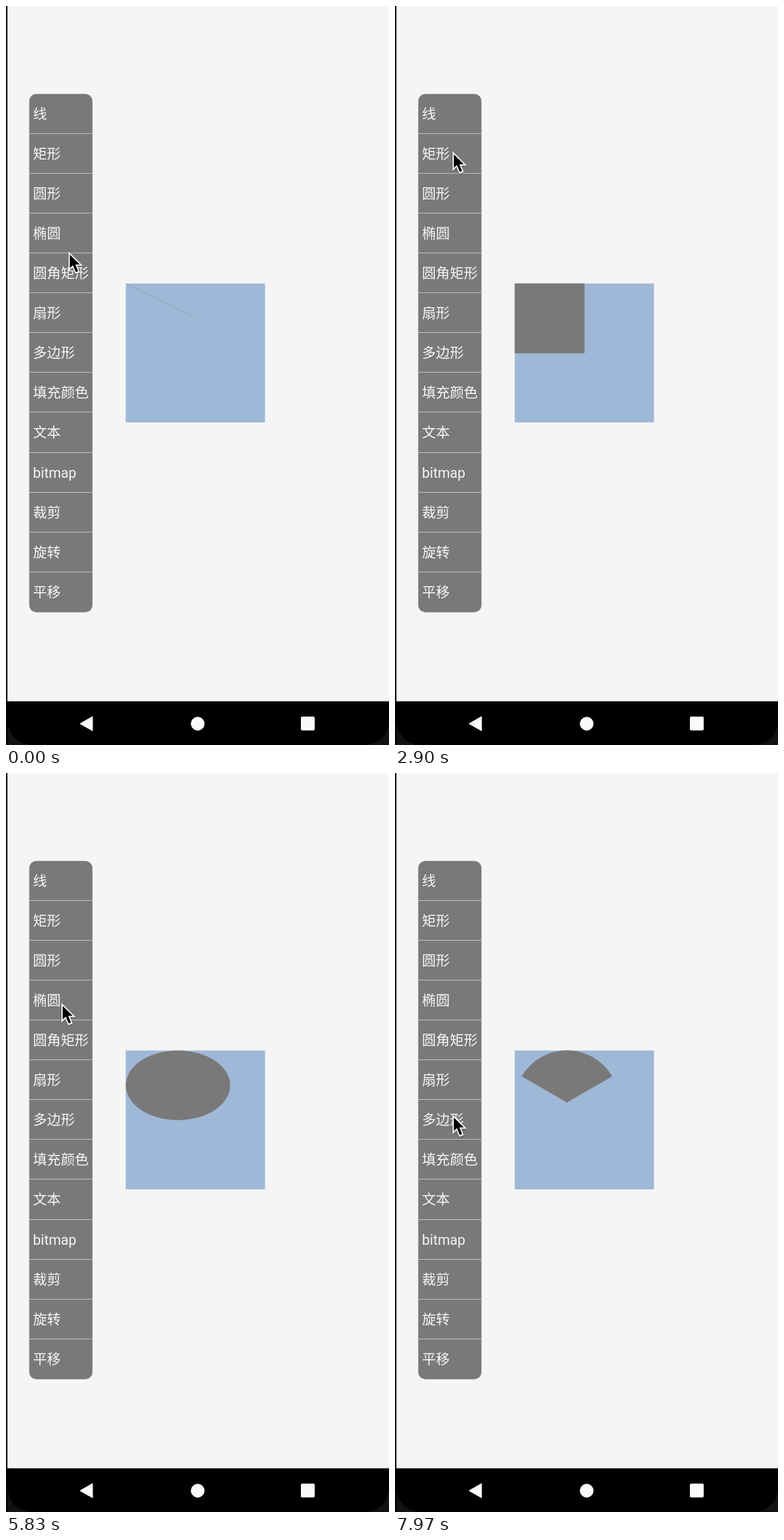
Animation of 539 by 1040 pixels, one loop 8000 ms. Source, as an HTML page:

```html
<!DOCTYPE html>
<html lang="zh-CN">
<head>
<meta charset="utf-8">
<title>Canvas shapes</title>
<style>
  html, body { margin: 0; width: 100%; height: 100%; overflow: hidden; background: #f5f5f5; }
  svg { display: block; }
  text { font: 19.6px Roboto, "Noto Sans CJK SC", "Noto Sans CJK", sans-serif; fill: #f7f7f7; }
  .fill { fill: #797979; }
  .hair { fill: none; stroke: #797979; stroke-opacity: .35; }
  #cursor { filter: drop-shadow(0 1px 1px rgba(0, 0, 0, .35)); }
</style>
</head>
<body>
<svg width="539" height="1040" viewBox="0 0 539 1040">
  <rect width="539" height="1040" fill="#f5f5f5"/>
  <rect y="979" width="539" height="61" fill="#121212"/>
  <path d="M2 978.5H539V1008Q536 1035 508 1040H34Q5 1036 2 1006Z"/>
  <rect width="2" height="1040"/>
  <g fill="#fafafa" stroke="#fafafa" stroke-linejoin="round">
    <path d="M104.3 1010L121.8 1000V1020Z"/>
    <circle cx="269.8" cy="1010" r="9.2"/>
    <rect x="415.5" y="1000.5" width="18.5" height="18.5" rx="1"/>
  </g>

  <rect x="32.7" y="123.8" width="89" height="729.4" rx="10" class="fill"/>
  <g id="menu"></g>

  <rect x="168.5" y="390.5" width="196" height="195.5" fill="#9fb8d7"/>
  <!-- data-at: time at which a shape replaces the one before -->
  <g id="shapes">
    <path data-at="0" class="hair" d="M169 391L266.5 438.5"/>
    <rect data-at="2900" class="fill" x="168.5" y="390.5" width="98.2" height="98.2"/>
    <circle data-at="4270" class="hair" cx="217.5" cy="439.5" r="49"/>
    <ellipse data-at="5400" class="fill" cx="242" cy="439.5" rx="73.5" ry="49"/>
    <rect data-at="6370" class="fill" x="168.5" y="390.5" width="196" height="98" rx="49" ry="24.5"/>
    <path data-at="7270" class="fill" d="M242 463.7L178.4 427A73.5 73.5 0 0 1 305.6 427Z"/>
  </g>

  <g id="cursor">
    <g transform="translate(0 .5) scale(1.73)">
      <path fill="#fff" d="M0 0V16L3.25 12.85 5.5 18.2 9.1 16.7 7 11.6H11.6Z"/>
      <path d="M1 2.4V13.6L3.55 11.15 5.93 16.77 7.77 15.99 5.5 10.6H9.2Z"/>
    </g>
  </g>
</svg>
<script>
const LOOP = 8000;
const STEP = 33.3;
const labels = ['线', '矩形', '圆形', '椭圆', '圆角矩形', '扇形', '多边形',
  '填充颜色', '文本', 'bitmap', '裁剪', '旋转', '平移'];
document.getElementById('menu').innerHTML = labels.map((label, i) => {
  const y = Math.floor(i * 56.12);
  const divider = i ? `<rect x="33" y="${123 + y}" width="88.5" height="1" fill="#bdbdbd"/>` : '';
  return `${divider}<text x="38" y="${159 + y}">${label}</text>`;
}).join('');

// Pointer stops: when the move there starts and ends, and its place
const stops = [
  [0, 0, 88, 345],
  [30, 700, 83, 155],
  [2100, 2430, 81, 204],
  [3730, 3970, 78, 265],
  [4797, 4830, 78, 272],
  [4830, 5070, 78, 323],
  [5830, 6100, 78, 373],
  [6700, 7000, 75, 424],
  [7600, 7970, 81, 480],
];

const shapes = [...document.getElementById('shapes').children];
const cursor = document.getElementById('cursor');

function pointerAt(t) {
  const i = stops.findLastIndex(s => t >= s[0]);
  const [start, end, x, y] = stops[i];
  if (t >= end) return [x, y];
  const [, , x0, y0] = stops[i - 1];
  const steps = Math.round((end - start) / STEP);
  const p = Math.floor((t - start) / (end - start) * steps) / steps;
  const e = p * p * (3 - 2 * p);
  // Long strokes bow to the left
  const bow = 0.0004 * (y - y0) ** 2 * Math.sin(Math.PI * e);
  return [x0 + (x - x0) * e - bow, y0 + (y - y0) * e];
}

function draw(t) {
  const current = shapes.findLast(shape => t >= shape.dataset.at);
  shapes.forEach(shape => shape.style.display = shape === current ? '' : 'none');
  cursor.setAttribute('transform', `translate(${pointerAt(t)})`);
}

const origin = performance.now();
function tick() {
  draw((performance.now() - origin) % LOOP);
  requestAnimationFrame(tick);
}
tick();
</script>
</body>
</html>
```
